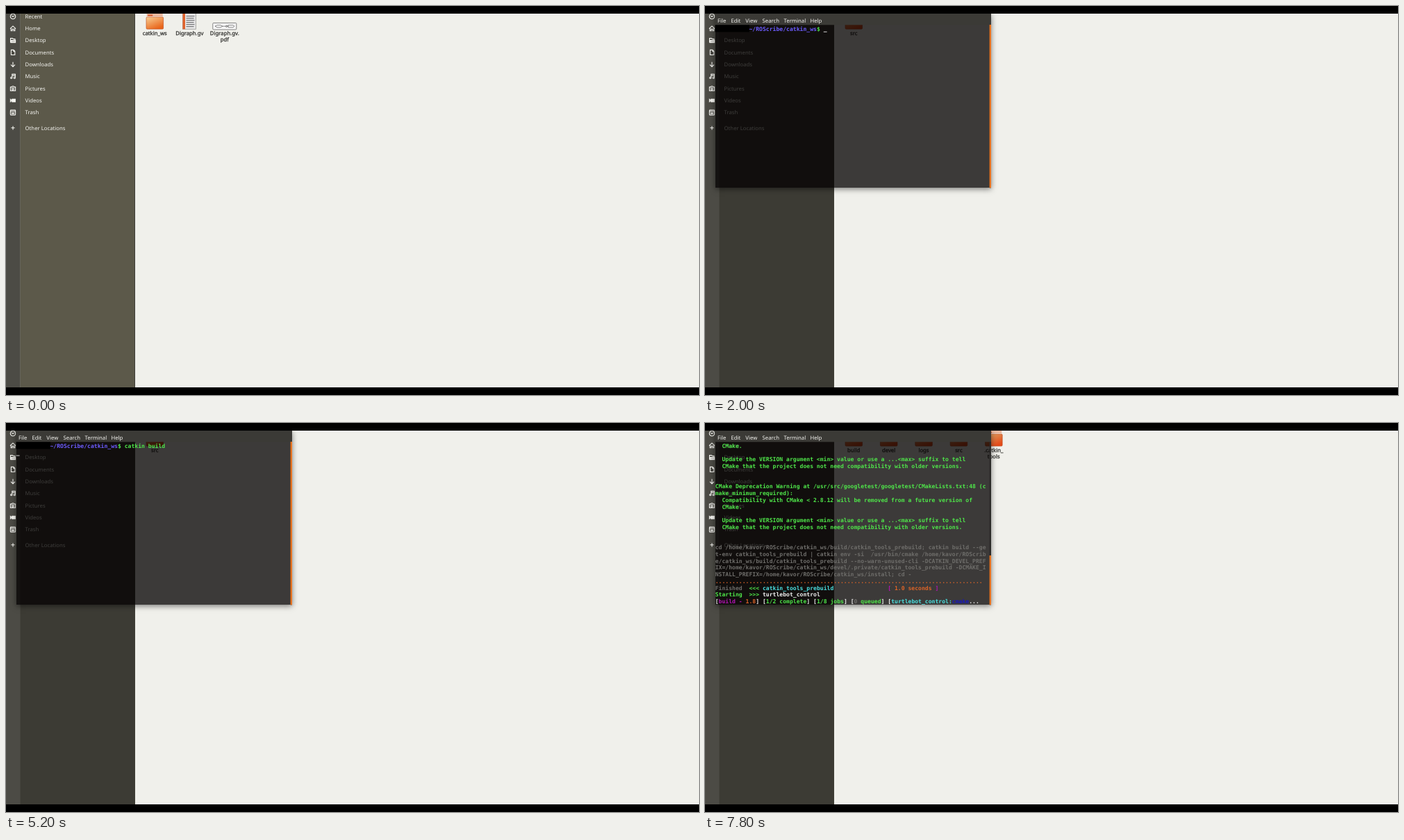
An HTML page that plays this animation: 998x561 px, repeating every 8000 ms.

```html
<!DOCTYPE html>
<html lang="en">
<head>
<meta charset="utf-8">
<title>Building a catkin workspace</title>
<style>
  html, body { margin: 0; width: 100%; height: 100%; overflow: hidden; background: #000; }
  svg { display: block; width: 100vw; height: 100vh; }
  text { white-space: pre; text-rendering: geometricPrecision; font: 7.75px "Noto Sans", "Open Sans", sans-serif; fill: #f4f4f0; }
  .label { fill: #2c2c2a; stroke: #2c2c2a; stroke-width: .25; text-anchor: middle; }
  .selected { fill: #fff; stroke: #fff; }
  .end { text-anchor: end; }
  .off { fill: #777570; }
  .mono { font: bold 8.1px "DejaVu Sans Mono", monospace; }
  .icon { fill: none; stroke: #f6f6f2; stroke-width: 1.1; }
  .glass { width: 100%; height: 100%; background: rgba(3, 1, 0, .757); box-shadow: 0 2px 8px rgba(0, 0, 0, .5); }
</style>
</head>
<body>
<svg id="stage" viewBox="0 0 998 561" preserveAspectRatio="none"></svg>
<script>
const LOOP = 8000, STEP = 200;
const COL = 4.876, ROW = 9.75, TERM_X = 14.7, TERM_Y = 35.8;
const HOME = '/home/kavor/ROScribe/catkin_ws';
const COLORS = {
  c: '#4adfe0', g: '#4fe64a', r: '#cc1010', b: '#1616c0', m: '#b414b4',
  o: '#dc6428', w: '#f2f2f2', x: '#6e6d6a', l: '#c4fbfb', p: '#6c5cff'
};

const PLACES = ['Recent', 'Home', 'Desktop', 'Documents', 'Downloads', 'Music', 'Pictures', 'Videos', 'Trash', 'Other Locations'];
// Icon outlines, each drawn around its own centre.
const ICONS = [
  'M-3.7 0a3.7 3.7 0 1 0 7.4 0a3.7 3.7 0 1 0-7.4 0M-1.8-1L0 .6L2-1.2',
  'M-4 .3L0-3.4L4 .3M-2.8 0V3.4H-1V1H1V3.4H2.8V0',
  'M-3.5 3V-3H-.5L.5-2H3V-.5M-3 3V0H3.6V3ZM-3 1.5H3.6',
  'M-2.6-3.6H1L2.8-1.8V3.6H-2.6ZM1-3.6V-1.6H2.8',
  'M0-3.6V3.2M-3 .4L0 3.4L3 .4',
  'M-1.2 2V-3.2H3.4V2M-3.4 2a1.1 1.1 0 1 0 2.2 0a1.1 1.1 0 1 0-2.2 0M1.2 2a1.1 1.1 0 1 0 2.2 0a1.1 1.1 0 1 0-2.2 0M-1.2-1.2H3.4',
  'M-3.6-2H-1.5L-1-3.2H1L1.5-2H3.6V3.2H-3.6ZM-1.4.6a1.4 1.4 0 1 0 2.8 0a1.4 1.4 0 1 0-2.8 0',
  'M-1.2-2H3.4V2H-1.2ZM-1 0H3.4M-1 1H3.4M-1-1H3.4M-3.6-1.8V1.8L-1.6 0Z',
  'M-3-3.4H3Q3.6-3.4 3.6-2.6V2.6Q3.6 3.6 2.6 3.6H-2.6Q-3.6 3.6-3.6 2.6V-2.6Q-3.6-3.4-3-3.4M-3.6-1.6H3.6M-1.4 0V2.4M0 0V2.4M1.4 0V2.4',
  'M-2.6 0H2.6M0-2.6V2.6'
];

const MENU = [
  ['New Folder', 'Shift+Ctrl+N', 158], ['Paste', 'Ctrl+V', 172], ['Select All', 'Ctrl+A', 186],
  ['Properties', 'Ctrl+I', 200], ['Open in Terminal', '', 214], ['Restore Missing Files…', '', 226.5]
];

// In terminal lines, ^ and a letter switch the colour.
const RULE = '^m' + '-'.repeat(67);
const setting = (name, value, tag = '', tagColor = 'c') =>
  `^c${name.padEnd(28 - tag.length)}^${tagColor}${tag} ^o${value}`;
const CONFIG = [
  setting('Log Space:', HOME + '/logs', '[missing]', 'r'),
  setting('Source Space:', HOME + '/src', '[exists]', 'g'),
  setting('DESTDIR:', 'None', '[unused]', 'b'),
  RULE,
  setting('Devel Space Layout:', 'linked'),
  setting('Install Space Layout:', 'None'),
  RULE,
  setting('Additional CMake Args:', 'None'),
  setting('Additional Make Args:', 'None'),
  setting('Additional catkin Make Args:', 'None'),
  setting('Internal Make Job Server:', 'True'),
  setting('Cache Job Environments:', 'False'),
  RULE,
  setting('Whitelisted Packages:', 'None'),
  setting('Blacklisted Packages:', 'None'),
  RULE,
  '^lWorkspace configuration appears valid.',
  '',
  '^lNOTE: ^gForcing CMake to run for each package.',
  RULE,
  "^g[build] Found '1' packages in 0.0 seconds.",
  '^g[build] Updating package table.',
  '^gStarting  >>> ^lcatkin_tools_prebuild'
];

const ADVICE = [
  '^g  CMake.', '',
  '^g  Update the VERSION argument <min> value or use a ...<max> suffix to tell',
  '^g  CMake that the project does not need compatibility with older versions.', '', ''
];
const COMMAND = `cd ${HOME}/build/catkin_tools_prebuild; catkin build --get-env catkin_tools_prebuild | ` +
  `catkin env -si  /usr/bin/cmake ${HOME}/build/catkin_tools_prebuild --no-warn-unused-cli ` +
  `-DCATKIN_DEVEL_PREFIX=${HOME}/devel/.private/catkin_tools_prebuild -DCMAKE_INSTALL_PREFIX=${HOME}/install; cd -`;
const RESULT = [
  ...ADVICE,
  '^gCMake Deprecation Warning at /usr/src/googletest/googletest/CMakeLists.txt:48 (c',
  '^gmake_minimum_required):',
  '^g  Compatibility with CMake < 2.8.12 will be removed from a future version of',
  ...ADVICE,
  ...COMMAND.match(/.{1,80}/g).map(part => '^x' + part),
  '^o' + '.'.repeat(79),
  '^xFinished  ^g<<< ^ccatkin_tools_prebuild' + ' '.repeat(16) + '^m[ ^o1.0 seconds ^m]',
  '^gStarting  >>> ^wturtlebot_control'
];

const escape = s => s.replace(/&/g, '&amp;').replace(/</g, '&lt;');
const text = (x, y, s, cls = '') => `<text x="${x}" y="${y}" class="${cls}">${escape(s)}</text>`;
const rect = (x, y, w, h, fill, extra = '') =>
  `<rect x="${x}" y="${y}" width="${w}" height="${h}" fill="${fill}" ${extra}/>`;

function termLine(line, row, col = 0) {
  const spans = line.split('^').slice(1)
    .map(s => `<tspan fill="${COLORS[s[0]]}">${escape(s.slice(1))}</tspan>`).join('');
  return `<text class="mono" x="${TERM_X + col * COL}" y="${TERM_Y + row * ROW}">${spans}</text>`;
}
const cursor = (row, col) => rect(TERM_X + col * COL, TERM_Y + 1 + row * ROW, COL, .9, '#e8e8e8');

function sidebar(focused) {
  const rows = PLACES.map((name, i) => {
    const y = i < 9 ? 15 + i * 17.32 : 175.8;
    return `<path class="icon" transform="translate(10 ${y})" d="${ICONS[i]}"/>` + text(27.5, y + 2.8, name);
  });
  return rect(0, 11, 20.5, 539, '#4c4b45') +
    rect(20.5, 11, 165.5, 539, focused ? '#5c594a' : '#3c3b34') +
    rect(20, 11, 1, 539, focused ? '#66645a' : '#45443d') +
    rect(185, 11, 1, 539, '#3f3e37') + rows.join('');
}

function folder(x, names, fill = 'hot', selected = false) {
  const labels = names.map((name, i) => text(x, 42.3 + i * 9, name, selected ? 'label selected' : 'label'));
  return rect(x - 11.5, 11, 23, 6, '#e9b9a0') + rect(x - 10, 12.5, 7, 2, '#d5582c') +
    rect(x - 11.5, 15, 23, 2, '#f7efe6') +
    rect(x - 12.2, 16, 24.6, 17.2, `url(#${fill})`, 'rx="1.3" stroke="#b9461a" stroke-width=".6"') +
    (selected ? rect(x - 19, 35, 38, 10, '#f07746', 'rx="2"') : '') + labels.join('');
}

function homeFiles(selected) {
  const lines = [14, 17, 20, 23, 26, 29].map((y, i) => rect(259.5, y, i % 2 ? 11 : 12, 1.2, '#77777a')).join('');
  return folder(214.2, ['catkin_ws'], 'warm', selected) +
    rect(254.5, 8, 19, 25.3, '#e6e6e6', 'stroke="#8d8d8b" stroke-width=".7"') +
    rect(254.5, 8, 3.5, 25.3, '#e0622c') + lines + text(264.3, 42.3, 'Digraph.gv', 'label') +
    rect(297.8, 24.5, 34, 9.5, '#f8f8f8', 'rx="1" stroke="#777" stroke-width=".9"') +
    '<path d="M301 29.2l3-1.6h5l3 1.6l-3 1.6h-5zM312 29.2h5M317 27.8v2.8l3-1.4zM320 27.6h7l2 1.6l-2 1.6h-7z" fill="none" stroke="#555" stroke-width=".7"/>' +
    text(314.8, 42.3, 'Digraph.gv.', 'label') + text(314.8, 51.3, 'pdf', 'label');
}

function files(step) {
  if (step < 3) return homeFiles(step === 2);
  if (step < 31) return folder(214.2, ['src']);
  return ['build', 'devel', 'logs', 'src'].map((name, i) => folder(214.2 + i * 50.4, [name])).join('') +
    folder(415.8, ['.catkin_', 'tools']);
}

function contextMenu(highlight) {
  const items = MENU.map(([name, keys, y], i) => {
    const cls = i === 1 ? 'off' : '';
    return (highlight && i === 4 ? rect(448, 208, 151.5, 12.5, '#f07746') : '') +
      text(457.7, y + 2.8, name, cls) + text(595.3, y + 2.8, keys, cls + ' end') +
      (i < 4 ? rect(448, y + 7, 151.5, .8, '#55534d') : '');
  });
  return rect(447.7, 152, 152, 80.8, '#3b3a35', 'stroke="#2a2926" stroke-width=".8"') + items.join('');
}

function status(step) {
  const done = step >= 36;
  const job = done ? '^cturtlebot_control:^bcmake' : '^ccatkin_tools_prebuild:^bc';
  const seconds = ((step - 30) * STEP / 1000).toFixed(1);
  return `^w[^mbuild - ^o${seconds}^w] [^g${+done}/2 complete^w] [^g1/8 jobs^w] [^x0 ^gqueued^w] [${job}^w...`;
}

function prompt(step) {
  const typed = 'catkin build'.slice(0, Math.max(0, step - 12 + (step > 18)));
  const entered = step >= 26;
  return rect(14.5, 27.5, 49.5, 10, '#000') +
    termLine(`^p~/ROScribe/catkin_ws^g$ ${typed}`, 0, 10) +
    cursor(+entered, entered ? 0 : 32 + typed.length);
}

function terminal(step) {
  const built = step >= 36, configured = step >= 29;
  const lines = built ? RESULT : CONFIG;
  const thumbTop = built ? 191 : configured ? 91 : 27;
  const menus = [['File', 18], ['Edit', 37.5], ['View', 58.3], ['Search', 82.5], ['Terminal', 113.5], ['Help', 151.5]];
  const body = !configured ? prompt(step) :
    lines.map((line, i) => termLine(line, i)).join('') +
    (step > 30 ? termLine(status(step), 23) : cursor(23, 0));
  return '<foreignObject x="14.5" y="11" width="397.5" height="251.3" overflow="visible">' +
    '<div xmlns="http://www.w3.org/1999/xhtml" class="glass"></div></foreignObject>' +
    rect(14.5, 11, 397.5, 16.3, '#3b3a36') +
    menus.map(([name, x]) => text(x, 23.6, name)).join('') +
    rect(409.6, 27.3, 2.4, 235, '#2b2a28') + rect(409.6, thumbTop, 2.4, 262.3 - thumbTop, '#e8731f') + body;
}

const gradient = (id, from, to) =>
  `<linearGradient id="${id}" x2=".6" y2="1"><stop stop-color="${from}"/><stop offset="1" stop-color="${to}"/></linearGradient>`;
const DEFS = `<defs>${gradient('warm', '#f8cf94', '#e9651a')}${gradient('hot', '#dfa868', '#e44a18')}</defs>`;

function draw(step) {
  const open = step >= 10;
  return DEFS + rect(0, 0, 998, 561, '#000') + rect(186, 11, 812, 539, '#f0f0eb') +
    sidebar(!open) + files(step) +
    (step >= 5 && step < 9 ? contextMenu(step >= 7) : '') +
    (open ? terminal(step) : '') +
    rect(0, 0, 998, 11, '#000') + rect(0, 550, 998, 11, '#000');
}

const stage = document.getElementById('stage');
let shown = -1;
function tick() {
  const step = Math.floor(performance.now() % LOOP / STEP);
  if (step !== shown) stage.innerHTML = draw(shown = step);
  requestAnimationFrame(tick);
}
tick();
</script>
</body>
</html>
```
